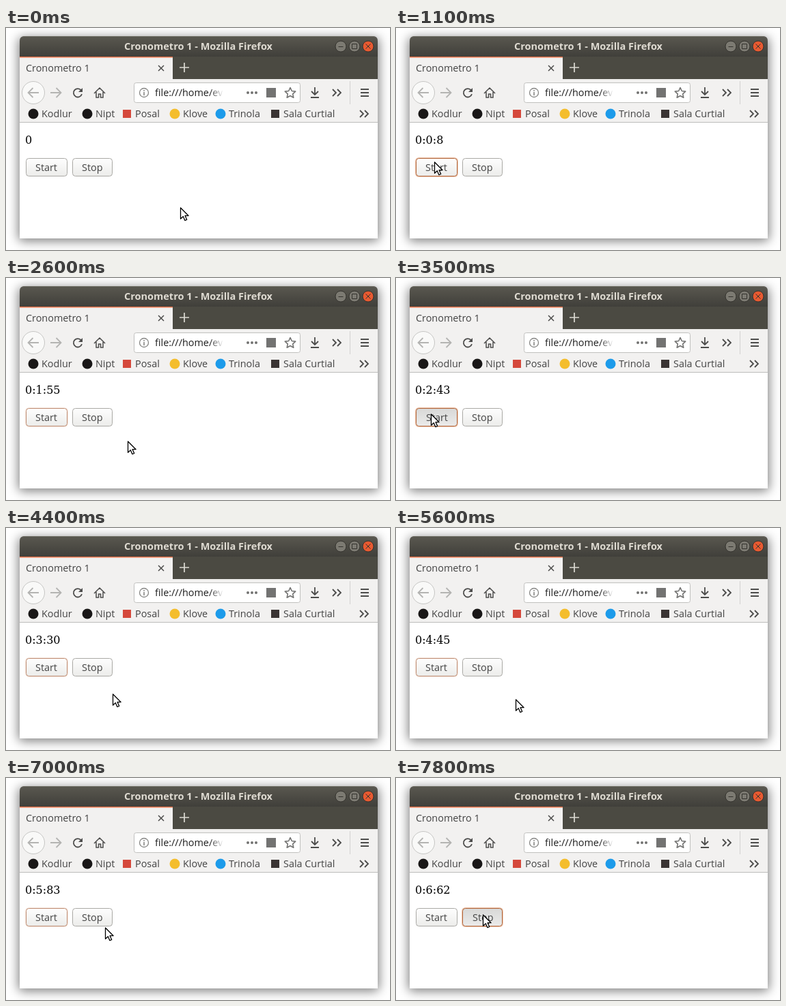
An HTML page for the animation above (8 s loop, 562 px wide and 326 px high).

```html
<!DOCTYPE html>
<html lang="es">
<head>
<meta charset="utf-8">
<title>Cronometro 1</title>
<style>
  html, body { margin: 0; width: 100%; height: 100%; overflow: hidden; background: #fff; }
  svg { display: block; width: 562px; height: 326px; }
  text { font: 14.4px "Open Sans", "Noto Sans", sans-serif; fill: #434343; white-space: pre; }
  .title { font-size: 14.5px; font-weight: 700; fill: #dfdbd2; text-anchor: middle; }
  .count { font: 16px "DejaVu Serif", serif; fill: #000; }
  .icon { fill: none; stroke: #4c4c4b; stroke-width: 1.8; }
  .thin { stroke-width: 1.5; }
  .dim { stroke: #b4b4b2; }
</style>
</head>
<body>
<svg viewBox="0 0 562 326">
  <defs>
    <filter id="shadow" x="-10%" y="-15%" width="120%" height="130%">
      <feGaussianBlur stdDeviation="8"/>
    </filter>
    <linearGradient id="bar" x2="0" y2="1">
      <stop stop-color="#5a5850"/><stop offset="1" stop-color="#403f3a"/>
    </linearGradient>
    <linearGradient id="up" x2="0" y2="1">
      <stop stop-color="#fefefe"/><stop offset="1" stop-color="#ececea"/>
    </linearGradient>
    <linearGradient id="down" x2="0" y2="1">
      <stop stop-color="#d8d8d7"/><stop offset="1" stop-color="#ebebea"/>
    </linearGradient>
    <linearGradient id="fade" gradientUnits="userSpaceOnUse" x1="298" x2="318">
      <stop stop-color="#1c1c1c"/><stop offset="1" stop-color="#1c1c1c" stop-opacity="0"/>
    </linearGradient>
  </defs>

  <rect width="562" height="326" fill="#fff"/>
  <rect x="18" y="14" width="528" height="299" rx="6" opacity=".5" filter="url(#shadow)"/>

  <!-- window -->
  <path d="M20 42V19q0-7 7-7h510q7 0 7 7v23z" fill="url(#bar)"/>
  <path d="M24 13.5q1-1 3-1h510q2 0 3 1" fill="none" stroke="#6a685f"/>
  <rect x="20" y="42" width="524" height="33" fill="#4b4a42"/>
  <rect x="20" y="75" width="524" height="63" fill="#f2f1f0"/>
  <rect x="20" y="42" width="224" height="33" fill="#f2f1f0"/>
  <rect x="20" y="42" width="224" height="1.5" fill="#e8744c"/>
  <rect x="20" y="138" width="524" height="1" fill="#bdbdbb"/>
  <rect x="20" y="139" width="524" height="170" fill="#fff"/>
  <text class="title" x="281.5" y="32">Cronometro 1 - Mozilla Firefox</text>
  <g stroke="#34332e">
    <circle cx="490" cy="27" r="8" fill="#7c7a72"/>
    <circle cx="510" cy="27" r="8" fill="#7c7a72"/>
    <circle cx="530" cy="27" r="8" fill="#e95a31"/>
    <path d="M486.5 27.5h7M506.500 23.500h7v7h-7zM526.500 23.500l7 7m0-7l-7 7" fill="none"/>
  </g>
  <text x="29" y="64">Cronometro 1</text>
  <path class="icon thin" d="M223 55l8 8m0-8l-8 8"/>
  <path d="M254 58h14M261 51v14" stroke="#dcdad2" stroke-width="1.700"/>

  <!-- toolbar -->
  <circle cx="40" cy="95" r="16.500" fill="#f9f9f8" stroke="#c6c6c4"/>
  <path class="icon dim" d="M48 95H33m6.500-7l-7 7 7 7M65 95h15m-6.500-7l7 7-7 7"/>
  <path class="icon" d="M110 91.500A6.200 6.200 0 1 0 111 97"/>
  <path d="M112 88v6h-6z" fill="#4c4c4b"/>
  <path class="icon thin" d="M129 96l8-8 8 8M132 94v8h3.500v-5h3v5h3.500v-8"/>
  <rect x="187.500" y="80.500" width="243" height="29" rx="3" fill="#fff" stroke="#c0c0be"/>
  <circle cx="202" cy="95" r="6.500" fill="none" stroke="#858583" stroke-width="1.300"/>
  <path d="M202 94v5M202 91v1.700" stroke="#858583" stroke-width="1.600"/>
  <text x="218" y="100" style="fill:url(#fade)">file:///home/ev</text>
  <g fill="#737372">
    <circle cx="354" cy="95" r="2"/><circle cx="360" cy="95" r="2"/><circle cx="366" cy="95" r="2"/>
    <rect x="381" y="88" width="14" height="14"/>
  </g>
  <path d="M416 87.500l2.300 5 5.400.6-4 3.700 1.100 5.400-4.800-2.700-4.800 2.700 1.100-5.400-4-3.700 5.400-.6z"
    fill="none" stroke="#737372" stroke-width="1.600" stroke-linejoin="round"/>
  <path class="icon" d="M452 87v11m-5-5l5 5 5-5M446 102h12M478 90l5 5-5 5M485 90l5 5-5 5"/>
  <path d="M503.500 78v34" stroke="#d2d2d0"/>
  <path class="icon" d="M519 90h12M519 95h12M519 100h12"/>
  <path class="icon" d="M518 121l5 5-5 5M525 121l5 5-5 5"/>
  <g id="marks"></g>

  <!-- page -->
  <text id="count" class="count" x="28" y="170"></text>
  <g id="buttons"></g>
  <path id="cursor" d="M.5 1V17.300l3.800-3.500 2.600 5.900 2.800-1.200-2.600-5.800h5z"
    fill="#fff" stroke="#000" stroke-width="1.300" stroke-linejoin="round"/>
</svg>
<script>
const LOOP = 8000, STEP = 100;
const $ = id => document.getElementById(id);

function add(parent, tag, attrs, text) {
  const el = document.createElementNS(parent.namespaceURI, tag);
  for (const k in attrs) el.setAttribute(k, attrs[k]);
  if (text) el.textContent = text;
  return parent.appendChild(el);
}

function addMark(x, name, fill, round) {
  const g = $("marks");
  if (round) add(g, "circle", { cx: x, cy: 126, r: 7.5, fill });
  else add(g, "rect", { x: x - 6, y: 120, width: 12, height: 12, fill });
  add(g, "text", { x: x + 12, y: 131 }, name);
}
addMark(40, "Kodlur", "#191717", true);
addMark(119, "Nipt", "#191717", true);
addMark(177, "Posal", "#d5493c", false);
addMark(247, "Klove", "#f4bd2c", true);
addMark(314, "Trinola", "#1d9bea", true);
addMark(394, "Sala Curtial", "#3a3433", false);

function makeButton(label, x, w) {
  const g = $("buttons");
  const box = { x: x + .5, y: 191.5, width: w - 1, height: 26, rx: 4 };
  return {
    x, w,
    halo: add(g, "rect", { ...box, fill: "none", "stroke-width": 3 }),
    box: add(g, "rect", box),
    label: add(g, "text", { y: 210 }, label)
  };
}
const startButton = makeButton("Start", 29, 61);
const stopButton = makeButton("Stop", 97, 59);

const home = { x: 255, y: 263 };
// each trip eases the pointer to x, y; bow bends it downwards
const trips = [
  { from: 200, to: 900, x: 56, y: 196, bow: 25 },
  { from: 1150, to: 1700, x: 206, y: 275, bow: 0 },
  { from: 1700, to: 2000, x: 178, y: 239, bow: 0 },
  { from: 2600, to: 3000, x: 51, y: 199, bow: 0 },
  { from: 3800, to: 4600, x: 175, y: 251, bow: 0 },
  { from: 6500, to: 7350, x: 127, y: 200, bow: 0 }
];

function pointer(t) {
  let { x, y } = home;
  for (const trip of trips) {
    const u = Math.min(1, Math.max(0, (t - trip.from) / (trip.to - trip.from)));
    const e = u * u * (3 - 2 * u);
    x += (trip.x - x) * e;
    y += (trip.y - y) * e + trip.bow * Math.sin(Math.PI * u);
  }
  return { x: Math.round(x), y: Math.round(y) };
}

// the stopwatch counts hundredths and lags a little midway
const lerp = (a, b, u) => a + (b - a) * u;
function hundredths(t) {
  if (t < 3500) return lerp(8, 243, (t - 1100) / 2400);
  if (t < 5600) return lerp(243, 445, (t - 3500) / 2100);
  return lerp(445, 662, Math.min(1, (t - 5600) / 2200));
}
function reading(t) {
  if (t < 1100) return "0";
  const n = Math.round(hundredths(t));
  return `0:${Math.floor(n / 100)}:${n % 100}`;
}

function paint(b, p, focus, pressed) {
  const hover = p.x >= b.x && p.x < b.x + b.w && p.y >= 191 && p.y < 218;
  b.box.setAttribute("fill", pressed ? "url(#down)" : "url(#up)");
  b.box.setAttribute("stroke", !focus ? "#aaa9a5" : hover ? "#b0663c" : "#bd8a70");
  b.halo.setAttribute("stroke", !focus ? "#fff" : hover ? "#f0c8b0" : "#faefe8");
  b.label.setAttribute("x", b.x + 14 + (pressed ? 1 : 0));
}

function draw(ms) {
  const t = Math.floor(ms % LOOP / STEP) * STEP;
  const p = pointer(t);
  const during = (a, b) => t >= a && t < b;
  $("cursor").setAttribute("transform", `translate(${p.x} ${p.y})`);
  $("count").textContent = reading(t);
  paint(startButton, p, during(900, 7600), during(900, 1100) || during(3400, 3600));
  paint(stopButton, p, during(7600, LOOP), during(7600, LOOP));
}

const start = performance.now();
function tick() {
  draw(performance.now() - start);
  requestAnimationFrame(tick);
}
tick();
</script>
</body>
</html>
```
